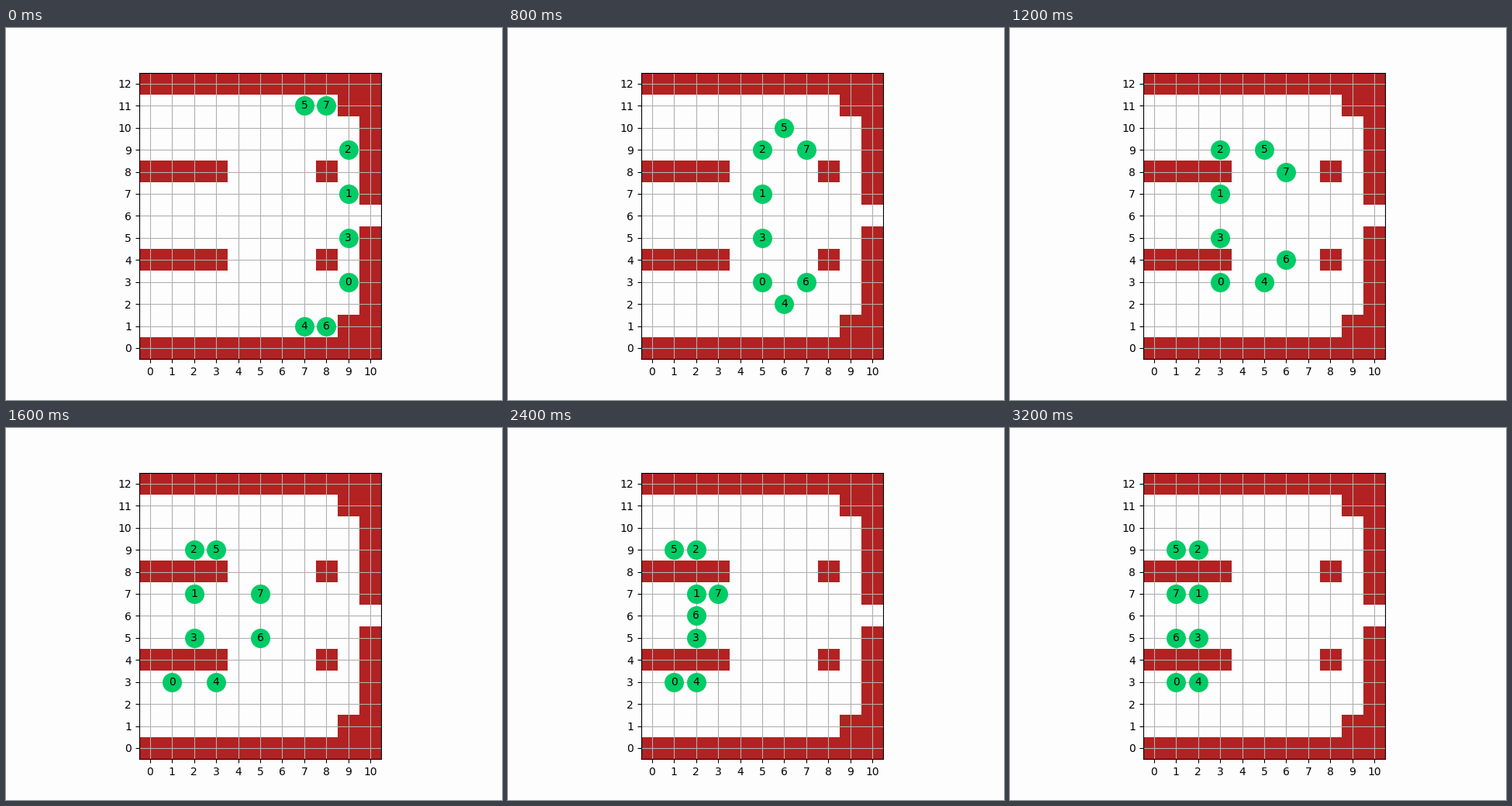
Write a matplotlib script that moves like this. It is 640 px wide and 480 px high and loops after 3.4 s.

```python
import numpy as np
import matplotlib.pyplot as plt
from matplotlib.animation import FuncAnimation
from matplotlib.colors import ListedColormap

COLS, ROWS = 11, 13
FRAMES, STEP_MS = 17, 200
PAPER, WALL, AGENT = "#fdfdfe", "firebrick", "#00cc66"

MOVES = {"L": (-1, 0), "R": (1, 0), "U": (0, 1), "D": (0, -1), ".": (0, 0)}

# Start cell and one move per step; an agent rests once its moves run out.
AGENTS = [
    ((9, 3), "LLLLLLLL"),
    ((9, 7), "LLLLLLL"),
    ((9, 9), "LLLLLLL"),
    ((9, 5), "LLLLLLL"),
    ((7, 1), "UL..ULLLL"),
    ((7, 11), "DL..DLLLULLD"),
    ((8, 1), "U.LUULULLLULLD"),
    ((8, 11), "D.LDDLDLLL..DLLU"),
]


def build_walls():
    walls = np.zeros((ROWS, COLS))
    walls[[0, -1]] = 1
    walls[:, -1] = 1
    walls[[1, -2], -2] = 1
    walls[6, -1] = 0
    for row in (4, 8):
        walls[row, :4] = walls[row, 8] = 1
    return walls


def trace(start, moves):
    steps = [start] + [MOVES[m] for m in moves.ljust(FRAMES - 1, ".")]
    return np.cumsum(steps, axis=0)


paths = np.array([trace(*agent) for agent in AGENTS])

fig, ax = plt.subplots(figsize=(6.4, 4.8), dpi=100, facecolor=PAPER)
ax.imshow(build_walls(), origin="lower", interpolation="nearest",
          cmap=ListedColormap([PAPER, WALL]))
ax.set_xticks(range(COLS))
ax.set_yticks(range(ROWS))
ax.grid(True)

discs, = ax.plot([], [], "o", color=AGENT, markersize=17)
labels = [ax.text(0, 0, str(i), ha="center", va="center")
          for i in range(len(AGENTS))]


def update(step):
    cells = paths[:, step]
    discs.set_data(cells[:, 0], cells[:, 1])
    for label, cell in zip(labels, cells):
        label.set_position(cell)
    return [discs, *labels]


anim = FuncAnimation(fig, update, frames=FRAMES, interval=STEP_MS,
                     repeat=True, repeat_delay=0)
plt.show()
```
